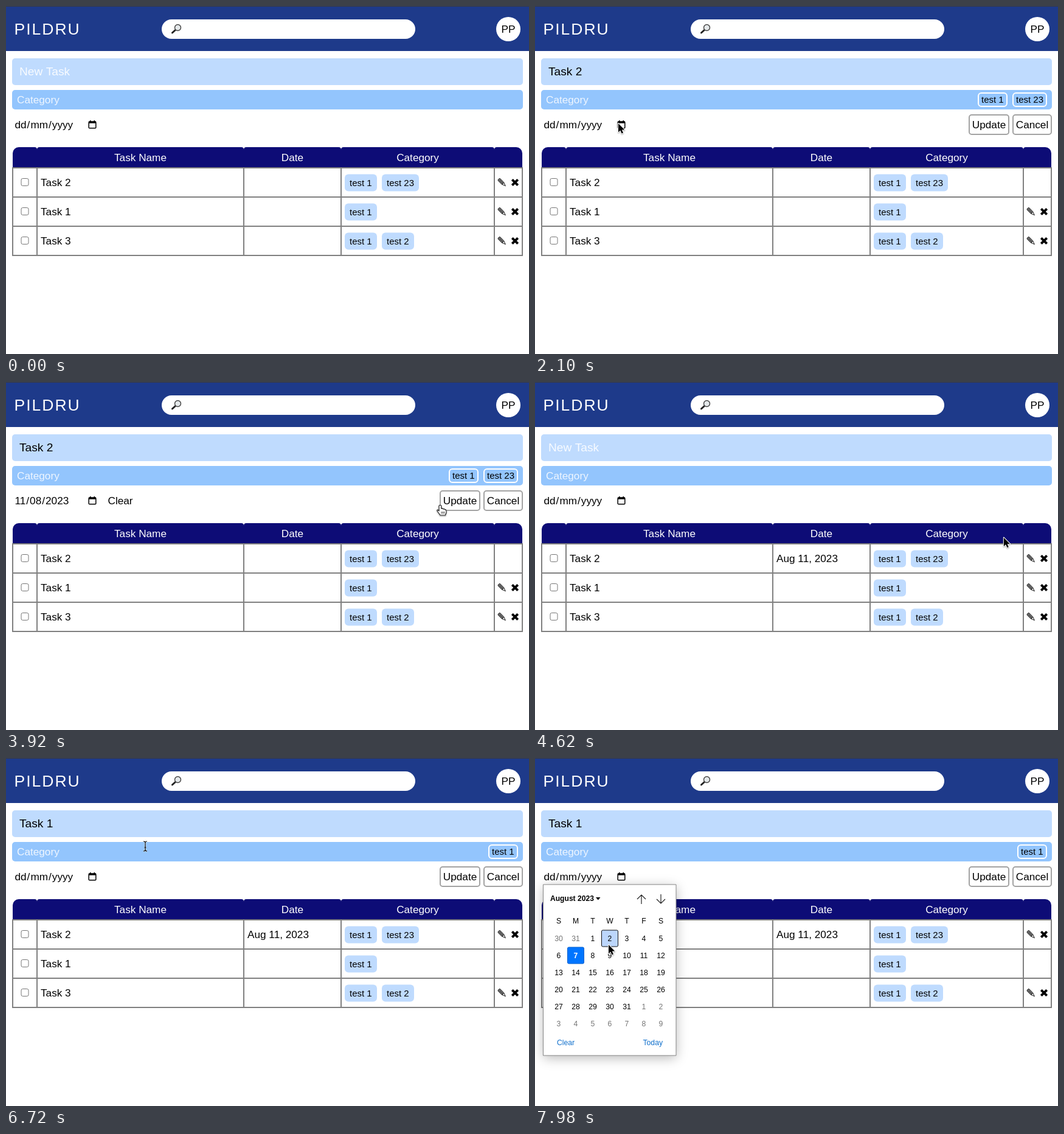
Animation, 860 px wide and 572 px high, one loop 8000 ms. Source, as an HTML page with a canvas:

```html
<!DOCTYPE html>
<html lang="en">
<head>
<meta charset="utf-8">
<title>Task planner</title>
<style>
  html, body { margin: 0; width: 100%; height: 100%; overflow: hidden; background: #fff; }
  canvas { display: block; width: 860px; height: 572px; }
</style>
</head>
<body>
<canvas id="stage" width="860" height="572"></canvas>
<script>
const ctx = document.getElementById('stage').getContext('2d');
const LOOP = 8000, STEP = 70;
const FONT = '"Liberation Sans", Arial, sans-serif';
const PALE = '#bfdbfe', SKY = '#93c5fd', GREY = '#808080';

const tasks = [
  { name: 'Task 2', tags: ['test 1', 'test 23'] },
  { name: 'Task 1', tags: ['test 1'] },
  { name: 'Task 3', tags: ['test 1', 'test 2'] }
];
const columns = [11, 51, 391, 551, 803, 849];
const headings = ['', 'Task Name', 'Date', 'Category', ''];
const rowY = i => 290 + i * 48;

// Pointer path: time, x, y
const path = [
  [70, 640, 460], [770, 806, 296], [910, 806, 296], [980, 815, 292], [1120, 815, 292],
  [1960, 139, 196], [2030, 137, 193], [2380, 137, 193], [2940, 173, 318], [3220, 176, 324],
  [3920, 714, 202], [4060, 737, 198], [4130, 735, 197], [4410, 735, 197], [4900, 826, 346],
  [5250, 758, 328], [5460, 339, 185], [5530, 339, 185], [6160, 840, 352], [6370, 814, 338],
  [6440, 814, 338], [6720, 229, 145], [6860, 229, 145], [7420, 141, 196], [7700, 141, 196],
  [7980, 121, 307]
];

const arrowShape = new Path2D('M0 0V14.5L3.3 11.4L5.6 16.6L8 15.6L5.8 10.5H10.3Z');
const handShape = new Path2D('M-2 1.5Q0-1 1.8 1.5V6Q4 5 5 7Q7 6 8 8Q10 7.5 10 10V13Q9 15 8.5 17H0Q-2 14-4 11.5Q-6 9-4.5 8Q-3.5 8-2 10Z');
const beamShape = new Path2D('M-3-8Q0-8 0-6Q0-8 3-8M0-6V6M-3 8Q0 8 0 6Q0 8 3 8M-1.5 2H1.5');

function text(str, x, midY, size = 17.2, color = '#000', align = 'left', weight = '') {
  ctx.font = `${weight} ${size}px ${FONT}`;
  ctx.textAlign = align;
  ctx.fillStyle = color;
  ctx.fillText(str, x, Math.round(midY + size * 0.36));
  return ctx.measureText(str).width;
}

function box(x, y, w, h, r, fill, stroke, line = 1) {
  ctx.beginPath();
  ctx.roundRect(x, y, w, h, r);
  if (fill) { ctx.fillStyle = fill; ctx.fill(); }
  if (stroke) { ctx.strokeStyle = stroke; ctx.lineWidth = line; ctx.stroke(); }
}

function strokes(d, color, width) {
  ctx.strokeStyle = color;
  ctx.lineWidth = width;
  ctx.stroke(new Path2D(d));
}

function at(x, y, draw) {
  ctx.save();
  ctx.translate(x, y);
  draw();
  ctx.restore();
}

function stateAt(t) {
  const editing = t >= 6440 ? 1 : t >= 1190 && t < 4200 ? 0 : -1;
  return {
    editing,
    popup: (t >= 2170 && t < 3290) || t >= 7490,
    picked: t >= 3290 && t < 4200,
    saved: t >= 4200
  };
}

function pointerAt(t) {
  if (t < path[0][0]) return null;
  const i = path.findIndex(p => p[0] > t);
  if (i < 0) return path.at(-1).slice(1);
  const [t0, x0, y0] = path[i - 1], [t1, x1, y1] = path[i];
  const u = (t - t0) / (t1 - t0), e = u * u * (3 - 2 * u);
  return [x0 + (x1 - x0) * e, y0 + (y1 - y0) * e];
}

function drawHeader() {
  ctx.fillStyle = '#1e3a8a';
  ctx.fillRect(0, 0, 860, 74);
  ctx.fillStyle = '#3a3a3e';
  ctx.fillRect(0, 0, 860, 1);
  ctx.letterSpacing = '2px';
  text('PILDRU', 13.5, 37.5, 26.5, '#fff');
  ctx.letterSpacing = '0px';
  box(256, 22, 417, 32, 16, '#fff');
  ctx.lineCap = 'round';
  strokes('M273.5 44L278.5 39.5', '#222', 3);
  ctx.lineCap = 'butt';
  box(277.5, 30.5, 10, 10, 5, '#e4e8ea', '#444', 1.4);
  box(806, 18, 40, 40, 20, '#fff');
  text('PP', 826, 37.5, 17.2, '#000', 'center');
}

function drawDate(parts) {
  let x = 14.5;
  parts.forEach((part, i) => {
    if (i) x += text('/', x, 195) + 1;
    x += text(part, x, 195) + 1;
  });
  box(136.2, 190.2, 11.6, 10.6, 1, '#fff', '#000', 1.5);
  ctx.fillStyle = '#000';
  ctx.fillRect(136, 189.5, 12, 3.2);
  ctx.fillRect(138, 188, 1.6, 2);
  ctx.fillRect(144.5, 188, 1.6, 2);
}

function drawForm({ editing, picked }) {
  const task = tasks[editing];
  box(10, 86, 840, 44, 5, PALE);
  text(task ? task.name : 'New Task', 22, 107.5, 19.2, task ? '#000' : '#f8fbff');
  box(10, 138, 840, 32, 5, SKY);
  text('Category', 18, 153.5, 17.2, '#eff6ff');
  drawDate(picked ? ['11', '08', '2023'] : ['dd', 'mm', 'yyyy']);
  if (picked) text('Clear', 167.5, 195);
  if (!task) return;

  let right = 842;
  for (const tag of [...task.tags].reverse()) {
    ctx.font = `15px ${FONT}`;
    const w = Math.round(ctx.measureText(tag).width + 12);
    box(right - w + 1, 143, w - 2, 22, 5, null, '#fff', 2);
    text(tag, right - w + 6, 154, 15);
    right -= w + 8;
  }
  for (const [label, x, w] of [['Update', 713, 67], ['Cancel', 785, 65]]) {
    box(x + 1, 179, w - 2, 32, 4, '#fff', '#a3a3a3', 2);
    text(label, x + w / 2, 195, 17.2, '#000', 'center');
  }
}

function drawIcons(y) {
  at(815.5, y, () => {
    ctx.rotate(Math.PI / 4);
    box(-7.5, -2.2, 10, 4.4, 1, '#8a8a8a', '#222', 1);
    strokes('M-6 0H2.5M2.5-2.2L8 0L2.5 2.2', '#222', 1);
  });
  at(837, y, () => strokes('M-4.7-4.7L4.7 4.7M4.7-4.7L-4.7 4.7', '#000', 4));
}

function drawTable({ editing, saved }) {
  headings.forEach((label, i) => {
    const x = columns[i], w = columns[i + 1] - x;
    box(x, 232, w, 34, [i ? 4 : 10, i < 4 ? 4 : 10, 0, 0], '#0d0c76');
    text(label, x + w / 2, 249, 17.2, '#fff', 'center');
  });
  ctx.fillStyle = GREY;
  for (let y = 265; y <= 409; y += 48) ctx.fillRect(10, y, 840, 2);
  for (const x of columns) ctx.fillRect(x - 1, 266, 2, 145);

  tasks.forEach((task, i) => {
    const y = rowY(i);
    box(25, y - 6.5, 12, 12, 2.5, '#fff', '#767676');
    text(task.name, 57, y);
    if (saved && i === 0) text('Aug 11, 2023', 397, y);
    let x = 557;
    for (const tag of task.tags) {
      ctx.font = `15px ${FONT}`;
      const w = Math.round(ctx.measureText(tag).width + 16);
      box(x, y - 13.5, w, 28, 6, PALE);
      text(tag, x + 8, y + 0.5, 15);
      x += w + 8;
    }
    if (i !== editing) drawIcons(y);
  });
}

function drawCalendar(pointer) {
  ctx.save();
  ctx.shadowColor = 'rgba(0,0,0,.28)';
  ctx.shadowBlur = 18;
  ctx.shadowOffsetY = 4;
  box(13.5, 208, 218.5, 281, 0, '#fff');
  ctx.restore();
  box(13.5, 208, 218.5, 281, 0, null, '#858585');

  text('August 2023', 25, 231, 12.1, '#000', 'left', 'bold');
  ctx.fillStyle = '#000';
  ctx.fill(new Path2D('M100 229H107.5L103.75 233.5Z'));
  strokes('M175 240V225M168 232L175 225L182 232M207 224V239M200 232L207 239L214 232', '#222', 1.2);

  [...'SMTWTFS'].forEach((day, i) => text(day, 39 + i * 28, 268, 12.2, '#000', 'center'));
  for (let i = 0; i < 42; i++) {
    const n = i - 1;
    const inside = n >= 1 && n <= 31;
    const label = n < 1 ? n + 31 : n > 31 ? n - 31 : n;
    const x = 39 + (i % 7) * 28, y = 296.5 + Math.floor(i / 7) * 28;
    const today = n === 7;
    const hover = Math.abs(pointer[0] - x) < 14 && Math.abs(pointer[1] - y) < 14;
    if (today) box(x - 13.5, y - 13.5, 27, 27, 2, '#0075ff', '#0a62cc');
    else if (hover) box(x - 13.5, y - 13.5, 27, 27, 2, '#bcd6fb', '#101010');
    text(label, x, y, 12.2, today ? '#fff' : inside ? '#000' : '#757575', 'center', today ? 'bold' : '');
  }
  text('Clear', 36, 468, 12.2, '#1070cc');
  text('Today', 210, 468, 12.2, '#1070cc', 'right');
}

function drawPointer([x, y], { editing, popup }) {
  const onButton = editing >= 0 && y > 178 && y < 212 && x > 713 && x < 850;
  const onIcon = tasks.some((_, i) => i !== editing && Math.abs(y - rowY(i)) < 9)
    && ((x > 807 && x < 823) || (x > 830 && x < 844));
  const onField = x > 10 && x < 850 && ((y > 86 && y < 130) || (y > 138 && y < 170));
  at(x, y, () => {
    ctx.lineJoin = 'round';
    if (onField) {
      ctx.strokeStyle = 'rgba(255,255,255,.7)';
      ctx.lineWidth = 2.6;
      ctx.stroke(beamShape);
      ctx.strokeStyle = '#000';
      ctx.lineWidth = 1.2;
      ctx.stroke(beamShape);
      return;
    }
    const hand = !popup && (onButton || onIcon);
    const shape = hand ? handShape : arrowShape;
    ctx.save();
    ctx.shadowColor = 'rgba(0,0,0,.35)';
    ctx.shadowBlur = 2;
    ctx.shadowOffsetY = 1;
    ctx.strokeStyle = '#fff';
    ctx.lineWidth = 2;
    ctx.stroke(shape);
    ctx.restore();
    ctx.fillStyle = hand ? '#fff' : '#000';
    ctx.fill(shape);
    if (hand) {
      ctx.strokeStyle = '#000';
      ctx.lineWidth = 1.1;
      ctx.stroke(shape);
      strokes('M2.2 11V14.5M4.5 11V14.5M6.8 11V14.5', '#000', 0.8);
    }
  });
}

function render(now) {
  const t = Math.floor((now % LOOP) / STEP) * STEP;
  const state = stateAt(t), pointer = pointerAt(t);
  ctx.fillStyle = '#fff';
  ctx.fillRect(0, 0, 860, 572);
  drawHeader();
  drawForm(state);
  drawTable(state);
  if (state.popup) drawCalendar(pointer);
  if (pointer) drawPointer(pointer, state);
}

const start = performance.now();
function frame() {
  render(performance.now() - start);
  requestAnimationFrame(frame);
}
frame();
</script>
</body>
</html>
```
